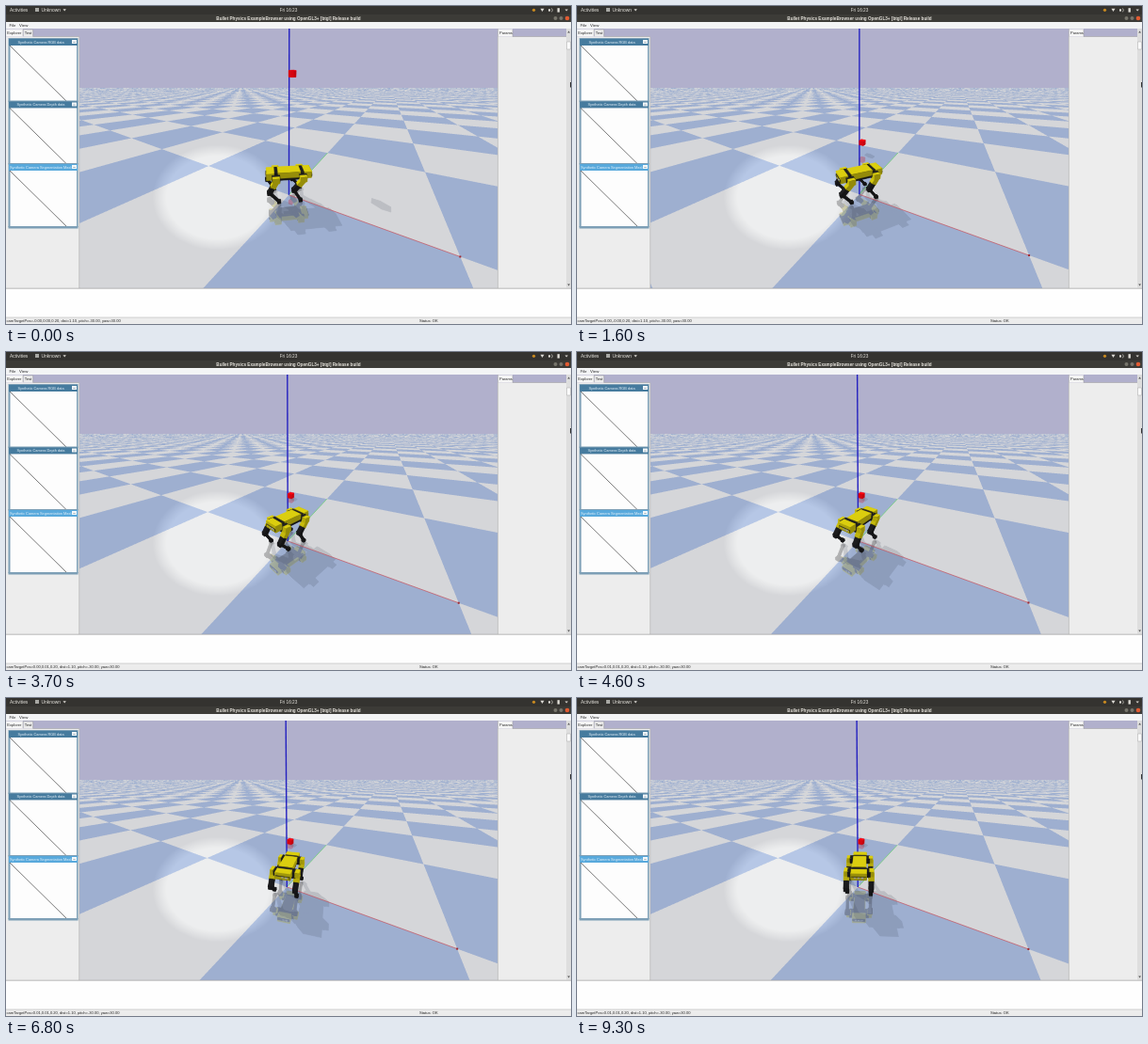
An HTML page with a canvas that plays this animation: 600 by 338 pixels, repeating every 9400 ms.

```html
<!DOCTYPE html>
<html lang="en">
<head>
<meta charset="utf-8">
<title>Walking robot simulation</title>
<style>
html, body { margin: 0; width: 100%; height: 100%; overflow: hidden; background: #fff; }
canvas { display: block; }
</style>
</head>
<body>
<canvas id="stage" width="600" height="338"></canvas>
<script>
const LOOP = 9400, STEP = 100;
const CX = 300, CY = 177.5, FOCAL = 160.5;
const COS = Math.cos(Math.PI / 6), SIN = 0.5;
const EYE_BACK = 1.1 * COS, EYE_Z = 0.2 + 1.1 * SIN;
const SHADOW = [0.735, -1.2];            // ground offset per unit of height
const LIGHT = [-0.426, 0.695, 0.579];
const SKY = '#b1b0cc';
const YELLOW = [236, 222, 16], BLACK = [34, 34, 36], RED = [300, 8, 22], GREY = [190, 190, 180];

// seconds, robot heading in degrees, camera target x and y
const KEYS = [
  [0, 187, -0.004, 0], [1.6, 204, 0.003, -0.004], [2.8, 214, -0.002, 0.004],
  [4.6, 232, 0.008, 0.007], [5.9, 246, 0.007, 0.006], [7.7, 266, 0.012, 0.011],
  [9.3, 268, 0.009, 0.01]
];

const stage = document.getElementById('stage');
const main = stage.getContext('2d');
const layer = document.createElement('canvas');
layer.width = 600;
layer.height = 338;
const scratch = layer.getContext('2d');
const ground = main.createImageData(444, 215);

function poseAt(time) {
  let i = 0;
  while (i < KEYS.length - 2 && time > KEYS[i + 1][0]) i++;
  const a = KEYS[i], b = KEYS[i + 1];
  const k = Math.min(1, (time - a[0]) / (b[0] - a[0]));
  return a.map((v, j) => v + (b[j] - v) * k);
}

// Scene points are [right, forward, height] with the camera target above 0,0.
const depth = p => (p[1] + EYE_BACK) * COS - (p[2] - EYE_Z) * SIN;
function project(p) {
  const d = depth(p), up = (p[1] + EYE_BACK) * SIN + (p[2] - EYE_Z) * COS;
  return [CX + FOCAL * p[0] / d, CY - FOCAL * up / d];
}

function drawGround(tx, ty) {
  const data = ground.data;
  for (let row = 0, o = 0; row < 215; row++) {
    for (let col = 0; col < 444; col++, o += 4) {
      let white = 0, sky = 0;
      for (let s = 0; s < 8; s++) {
        const u = (78 + col + (s % 2) / 2 + 0.25 - CX) / FOCAL;
        const v = (CY - 85 - row - (s >> 1) / 4 - 0.125) / FOCAL;
        const t = EYE_Z / (SIN - COS * v);
        if (t < 0 || t > 64) { sky++; continue; }
        const r = u * t, f = (COS + SIN * v) * t - EYE_BACK;
        const x = Math.floor(COS * r - SIN * f + tx), y = Math.floor(SIN * r + COS * f + ty);
        if (!((x + y) & 1)) white++;
      }
      const ex = (col + 78 - 224) / 69, ey = (row + 85 - 203) / 56;
      const glow = 24 * Math.max(0, Math.min(1, 2.6 * (1 - ex * ex - ey * ey)));
      const blue = 8 - white - sky;
      data[o] = (white * 213 + blue * 158 + sky * 177) / 8 + glow;
      data[o + 1] = (white * 214 + blue * 175 + sky * 176) / 8 + glow;
      data[o + 2] = (white * 217 + blue * 208 + sky * 204) / 8 + glow * 0.9;
      data[o + 3] = 255;
    }
  }
  rect(78, 17, 444, 68, SKY);
  main.putImageData(ground, 78, 85);
}

const add = (p, q, k = 1) => p.map((v, i) => v + q[i] * k);

// Box from a centre and three half axes, added to a list of shaded faces.
function addBox(faces, c, axes, color) {
  axes.forEach((n, i) => {
    const u = axes[(i + 1) % 3], w = axes[(i + 2) % 3];
    for (const side of [1, -1]) {
      const m = add(c, n, side);
      const pts = [[1, 1], [1, -1], [-1, -1], [-1, 1]].map(([a, b]) => add(add(m, u, a), w, b));
      const lit = side * n.reduce((sum, v, j) => sum + v * LIGHT[j], 0) / Math.hypot(...n);
      const shade = 0.8 + 0.22 * lit;
      faces.push({ pts, color: `rgb(${color.map(v => Math.min(255, v * shade)).join()})` });
    }
  });
}

function buildRobot(faces, time, heading) {
  const c = Math.cos(heading), s = Math.sin(heading);
  const turn = ([x, y, z]) => [x * c - y * s, x * s + y * c, z];
  const part = (center, axes, color) => addBox(faces, turn(center), axes.map(turn), color);
  const block = (center, [x, y, z], color) =>
    part(center, [[x, 0, 0], [0, y, 0], [0, 0, z]], color);
  const bar = (a, b, thick, color) => {
    const u = add(b, a, -1).map(v => v / 2), len = Math.hypot(u[0], u[2]);
    part(add(a, u), [u, [0, thick, 0], [-u[2] / len * thick, 0, u[0] / len * thick]], color);
  };

  block([0, 0, 0.178], [0.09, 0.042, 0.01], BLACK);
  block([0, 0, 0.208], [0.08, 0.047, 0.022], YELLOW);
  for (const end of [1, -1]) {
    block([end * 0.093, 0, 0.203], [0.012, 0.046, 0.024], BLACK);
    block([end * 0.132, 0, 0.204], [0.027, 0.05, 0.024], YELLOW);
    block([end * 0.161, 0, 0.196], [0.002, 0.046, 0.009], BLACK);
  }
  for (const y of [-0.024, 0, 0.024]) block([0.164, y, 0.197], [0.001, 0.006, 0.003], GREY);

  for (const end of [1, -1]) for (const side of [1, -1]) {
    const phase = 2 * Math.PI * (time / 1.2 + (end * side > 0 ? 0 : 0.5));
    const x = end * 0.094, y = side * 0.084;
    const hip = [x, y, 0.19];
    const foot = [x - 0.014 * Math.cos(phase), side * 0.086, 0.012 + 0.018 * Math.max(0, Math.sin(phase))];
    const dx = foot[0] - x, dz = foot[2] - hip[2], len = Math.hypot(dx, dz);
    const bend = Math.sqrt(Math.max(0, 0.0113 - len * len / 4));
    const knee = [x + dx / 2 - dz / len * bend, y, hip[2] + dz / 2 + dx / len * bend];
    const middle = add(hip, add(knee, hip, -1), 0.5);
    block([x, side * 0.062, 0.195], [0.026, 0.014, 0.02], BLACK);
    block([x, side * 0.084, 0.197], [0.023, 0.014, 0.019], YELLOW);
    bar(hip, middle, 0.017, YELLOW);
    bar(middle, knee, 0.015, BLACK);
    block(knee, [0.014, 0.014, 0.013], BLACK);
    bar(knee, foot, 0.008, BLACK);
    block(foot, [0.011, 0.011, 0.01], BLACK);
  }
}

function paintFaces(ctx, faces, place, color) {
  const placed = faces.map(face => {
    const pts = face.pts.map(place);
    return { pts, color: color || face.color, far: pts.reduce((sum, p) => sum + depth(p), 0) };
  });
  placed.sort((a, b) => b.far - a.far);
  for (const face of placed) {
    ctx.beginPath();
    face.pts.forEach(p => ctx.lineTo(...project(p)));
    ctx.closePath();
    ctx.fillStyle = ctx.strokeStyle = face.color;
    ctx.lineWidth = 0.3;
    ctx.fill();
    ctx.stroke();
  }
}

function paintFaint(faces, place, alpha, color) {
  scratch.clearRect(0, 0, 600, 338);
  paintFaces(scratch, faces, place, color);
  main.globalAlpha = alpha;
  main.drawImage(layer, 0, 0);
  main.globalAlpha = 1;
}

function line(color, width, ...points) {
  main.strokeStyle = color;
  main.lineWidth = width;
  main.beginPath();
  points.forEach(p => main.lineTo(...p));
  main.stroke();
}

function drawScene(time, heading, tx, ty) {
  drawGround(tx, ty);
  const world = (x, y, z) =>
    [COS * (x - tx) + SIN * (y - ty), COS * (y - ty) - SIN * (x - tx), z];

  const faces = [];
  const drop = Math.max(0.03, 0.858 - 0.288 * time * time);
  const size = 0.028;
  addBox(faces, world(-0.425, 0.81, drop),
    [[COS * size, -SIN * size, 0], [SIN * size, COS * size, 0], [0, 0, size]], RED);
  buildRobot(faces, time, heading * Math.PI / 180);

  paintFaint(faces, p => [p[0], p[1], -p[2]], 0.27);
  paintFaint(faces, p => [p[0] + SHADOW[0] * p[2], p[1] + SHADOW[1] * p[2], 0], 0.15, '#343c4c');

  const origin = project(world(0, 0, 0)), tip = project(world(1, 0, 0));
  line('#c4505c', 0.7, origin, tip);
  line('#70d078', 0.8, origin, project(world(0, 1, 0)));
  line('#2420c0', 1.4, origin, project(world(0, 0, 1)));
  rect(tip[0] - 1, tip[1] - 1, 2, 2, '#a02830');
  paintFaces(main, faces, p => p);
}

function rect(x, y, w, h, color) {
  main.fillStyle = color;
  main.fillRect(x, y, w, h);
}

function dot(x, y, r, color) {
  main.fillStyle = color;
  main.beginPath();
  main.arc(x, y, r, 0, 7);
  main.fill();
}

function text(str, x, y, size, color = '#222', align = 'left', weight = '') {
  main.font = `${weight} ${size}px "Liberation Sans", Arial, sans-serif`;
  main.textAlign = align;
  main.fillStyle = color;
  main.fillText(str, x, y);
}

function triangle(x, y, w, h, color) {
  main.fillStyle = color;
  main.beginPath();
  main.moveTo(x, y);
  main.lineTo(x + w, y);
  main.lineTo(x + w / 2, y + h);
  main.fill();
}

function cameraWindow(y, title, header) {
  rect(2.5, y - 1, 74, 68, '#7d9fb6');
  rect(3, y, 73, 7, header);
  rect(4.5, y + 7, 70.5, 59, '#fdfdfd');
  main.save();
  main.beginPath();
  main.rect(4, y, 65.5, 7);
  main.clip();
  const long = title.includes('Mask');
  text(title, long ? 4 : 37, y + 4.9, 3.9, '#e4f0f8', long ? 'left' : 'center');
  main.restore();
  rect(70, y + 1, 5, 4, '#f4f8fa');
  rect(71.2, y + 3.2, 2.6, 0.6, '#7890a0');
  line('#333', 0.65, [4, y + 7], [64, y + 66]);
}

function drawDesktop(tx, ty) {
  rect(0, 0, 600, 9, '#343330');
  rect(0, 9, 600, 8, '#3c3b37');
  text('Activities', 4, 6.2, 4.9, '#e8e6e0');
  rect(31, 2, 4, 4, '#a8a8a4');
  text('Unknown', 37.5, 6.2, 4.9, '#e8e6e0');
  triangle(60.5, 3.2, 3.4, 2.2, '#d8d6d0');
  text('Fri 16:23', 300, 6.2, 4.7, '#e8e6e0', 'center');
  dot(560.5, 4.3, 1.6, '#c98a20');
  triangle(567.5, 2.7, 4, 3.4, '#dedcd6');
  rect(576, 3.3, 2, 2.3, '#dedcd6');
  line('#dedcd6', 0.7, [579.5, 2.5], [580.3, 4.4], [579.5, 6.3]);
  rect(585.5, 2.2, 2.4, 4.4, '#dedcd6');
  triangle(593.5, 3.4, 3.4, 2.2, '#d8d6d0');
  text('Bullet Physics ExampleBrowser using OpenGL3+ [btgl] Release build',
    300, 14.6, 4.65, '#e6e3dc', 'center', 'bold');
  dot(583.5, 13, 2, '#77756c');
  dot(589.5, 13, 2, '#77756c');
  dot(596, 13, 2.3, '#e15b32');

  rect(0, 17, 600, 7, '#f3f4f5');
  text('File', 3.5, 22.1, 4.3);
  text('View', 14, 22.1, 4.3);

  rect(0, 24, 78, 276, '#ededed');
  rect(0, 24, 78, 8.5, SKY);
  rect(0, 24.5, 18, 8, '#f5f5f5');
  rect(18.5, 25, 10, 7.5, '#ececec');
  line('#999', 0.5, [18, 32], [18, 25], [28.7, 25], [28.7, 32.5], [78, 32.5]);
  text('Explorer', 1.2, 30.1, 4.1);
  text('Test', 19.7, 30.1, 4.1);
  line('#b4b4b4', 0.7, [77.7, 33], [77.7, 300]);
  cameraWindow(35, 'Synthetic Camera RGB data', '#467b9e');
  cameraWindow(101.5, 'Synthetic Camera Depth data', '#467b9e');
  cameraWindow(168, 'Synthetic Camera Segmentation Mask data', '#58a9dc');
  rect(2.5, 234, 74, 2.5, '#7d9fb6');

  rect(522, 24, 78, 276, '#ededed');
  rect(522, 24, 78, 8.5, SKY);
  rect(522.5, 24.5, 15.5, 8, '#f5f5f5');
  line('#999', 0.5, [538, 25], [538, 32.5], [595, 32.5]);
  text('Params', 524, 30.1, 4);
  line('#b4b4b4', 0.7, [522.4, 24], [522.4, 300]);
  rect(595, 24, 5, 275.5, '#dedede');
  rect(595.5, 38, 4, 8, '#fafafa');
  line('#aaa', 0.5, [595.5, 38], [599.5, 38], [599.5, 46], [595.5, 46], [595.5, 38]);
  triangle(596.2, 28.5, 2.8, -2, '#555');
  triangle(596.2, 295.5, 2.8, 2, '#555');
  line('#222', 0.9, [599.5, 81], [599.5, 86.5]);

  rect(0, 300, 600, 31, '#fefefe');
  line('#999', 0.7, [0, 300.2], [600, 300.2]);
  rect(0, 331, 600, 7, '#ececec');
  line('#b8b8b8', 0.6, [0, 331], [600, 331]);
  text(`camTargetPos=${tx.toFixed(2)},${ty.toFixed(2)},0.20, dist=1.10, pitch=-30.00, yaw=30.00`,
    0.5, 335.8, 4.07);
  text('Status: OK', 439, 335.8, 4.07);
}

let shown = -1;
function tick() {
  const step = Math.floor((performance.now() % LOOP) / STEP);
  if (step !== shown) {
    shown = step;
    const time = step * STEP / 1000;
    const [, heading, tx, ty] = poseAt(time);
    drawScene(time, heading, tx, ty);
    drawDesktop(tx, ty);
  }
  requestAnimationFrame(tick);
}
tick();
</script>
</body>
</html>
```
